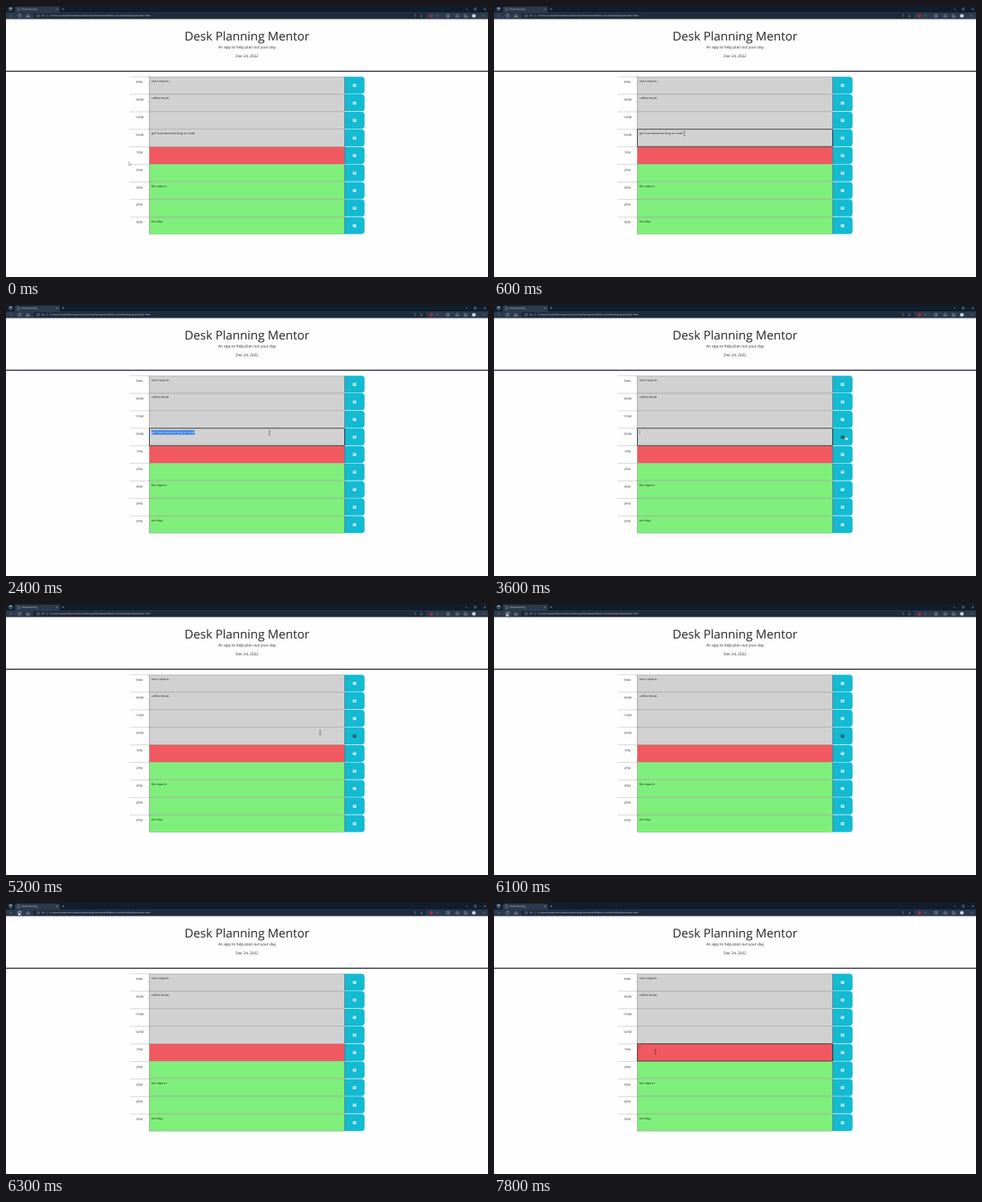
Write an HTML page that moves like this. It is 600x338 px and loops after 8 s.

```html
<!DOCTYPE html>
<html lang="en">
<head>
<meta charset="utf-8">
<title>Desk Planning</title>
<style>
  html, body { margin: 0; width: 100%; height: 100%; overflow: hidden; background: #fefefe; }
  svg { display: block; width: 100%; height: 100%; }
  text { text-rendering: geometricPrecision; white-space: pre; }
  .styled { font-family: "Open Sans", sans-serif; }
  .plain { font-family: "Liberation Sans", sans-serif; }
</style>
</head>
<body>
<svg id="stage" viewBox="0 0 600 338"></svg>
<script>
const LOOP = 8000;
const stage = document.getElementById('stage');

const LEFT = 154, TEXT = 178.4, SAVE = 421.7, RIGHT = 446.4;
const TOP = 88, PITCH = 21.875;
const HOURS = ['9AM', '10AM', '11AM', '12AM', '1PM', '2PM', '3PM', '4PM', '5PM'];
const NOTES = { 0: 'start reports', 1: 'coffee break', 6: 'file reports', 8: 'end day' };
const NOTE = 'get frustrated working on code';
const NOTE_ROW = 3, NOW_ROW = 4;
const COLORS = { past: '#d1d1d1', now: '#f0595f', next: '#7eef7a', save: '#13bad2', ink: '#222529' };

function add(parent, tag, attrs = {}, content) {
  const el = document.createElementNS('http://www.w3.org/2000/svg', tag);
  for (const key in attrs) el.setAttribute(key, attrs[key]);
  if (content !== undefined) el.textContent = content;
  parent.append(el);
  return el;
}
const group = (parent, attrs) => add(parent, 'g', attrs);
const rect = (parent, x, y, width, height, fill, more) =>
  add(parent, 'rect', { x, y, width, height, fill, ...more });
const path = (parent, d, stroke, width = 0.5, fill = 'none') =>
  add(parent, 'path', { d, stroke, 'stroke-width': width, fill });
const label = (parent, x, y, size, content, more) =>
  add(parent, 'text', { x, y, 'font-size': size, fill: COLORS.ink, ...more }, content);
const show = (el, on) => el.setAttribute('display', on ? 'inline' : 'none');
const rowY = i => TOP + i * PITCH;

function saveIcon(parent, y) {
  return add(parent, 'path', {
    d: `M432.2 ${y - 1.9}h2.8l.9.9v2.5q0 .4-.4.4h-3.3q-.4 0-.4-.4v-3q0-.4.4-.4z` +
       `M432.5 ${y - 1.4}v1h2.2v-1zM433.2 ${y + 0.7}a.65.65 0 1 0 1.3 0a.65.65 0 1 0-1.3 0z`,
    fill: '#fff', 'fill-rule': 'evenodd'
  });
}

function drawPage(styled) {
  const page = group(stage, { class: styled ? 'styled' : 'plain' });
  const shift = styled ? 0 : -11;
  const center = { 'text-anchor': 'middle' };
  rect(page, 0, 16, 600, 322, '#fefefe');
  label(page, 300, styled ? 43 : 42.3, 15.1, 'Desk Planning Mentor', center);
  label(page, 300, 53.1, styled ? 4.72 : 4.6, 'An app to help plan out your day', center);
  if (styled) label(page, 300, 63.9, 4.72, 'Dec 24, 2022', center);
  rect(page, 0, 80.7 + shift, 600, 1.4, '#2a2d38');

  const icons = HOURS.map((hour, i) => {
    const y = rowY(i) + shift;
    path(page, `M${LEFT} ${y + 0.2}H${TEXT}`, '#999', 0.4);
    path(page, `M${TEXT} ${y}v${PITCH}`, '#666', 0.4);
    label(page, 166, y + 8.3, 3.75, hour, center);
    if (styled) {
      const fill = i < NOW_ROW ? COLORS.past : i === NOW_ROW ? COLORS.now : COLORS.next;
      rect(page, TEXT + 0.2, y + 0.2, SAVE - TEXT - 0.3, PITCH - 0.5, fill,
        { stroke: '#777', 'stroke-width': 0.3 });
      if (NOTES[i]) label(page, 181, y + 6.5, 3.75, NOTES[i]);
    }
    const h = PITCH - 0.6, r = 4.2;
    path(page, `M${SAVE} ${y + 0.2}H${RIGHT - r}q${r} 0 ${r} ${r}v${h - 2 * r}` +
      `q0 ${r} ${-r} ${r}H${SAVE}z`, 'none', 0, COLORS.save);
    path(page, `M${SAVE} ${y + 0.2}v${h}`, '#234', 0.4);
    return saveIcon(page, y + 10.9);
  });
  return { page, icons };
}

function drawBrowser() {
  const g = group(stage, { class: 'styled' });
  const pale = '#c4ccd5';
  rect(g, 0, 0, 600, 8.5, '#0f1d2c');
  rect(g, 0, 8, 600, 8.4, '#2b3a4c');
  rect(g, 11, 0.8, 56, 9, '#2b3a4c', { rx: 1.5 });
  rect(g, 34, 9, 489, 6.5, '#1d2a3a', { rx: 1.2 });
  rect(g, 4, 2.2, 3.4, 3.4, 'none', { stroke: pale, 'stroke-width': 0.5, rx: 0.5 });
  rect(g, 4, 2.2, 3.4, 1.2, pale);
  path(g, 'M14.4 2.3h1.7l.8.8v2.9h-2.5z', pale, 0.35);
  label(g, 19.6, 5.1, 2.95, 'Desk Planning', { fill: '#dde3e9' });
  path(g, 'M62.7 3l1.8 1.8m0-1.8l-1.8 1.8M69.6 4h2.8m-1.4-1.4v2.8', pale, 0.4);
  path(g, 'M572 4h2.6M583 2.8h2.3v2.3H583zM594.8 2.8l2.4 2.4m0-2.4l-2.4 2.4', pale, 0.4);

  path(g, 'M8 12.2H4.7m1.5-1.5l-1.5 1.5l1.5 1.5', '#6d7986', 0.5);
  const reload = rect(g, 13.6, 9.2, 6.6, 6.3, '#435266', { rx: 1 });
  path(g, 'M18.3 11.2a1.8 1.8 0 1 0 .3 1.4m.1-2.3v1.2h-1.2', pale, 0.5);
  path(g, 'M25.6 14v-2l1.7-1.5l1.7 1.5v2h-1.2v-1.3h-1V14z', pale, 0.45);
  add(g, 'circle', { cx: 40, cy: 12.2, r: 1.6, fill: 'none', stroke: pale, 'stroke-width': 0.35 });
  path(g, 'M40 11.9v1.2m0-2v.3M51.2 10.5v3.4', pale, 0.35);
  label(g, 43.7, 13.3, 3.05, 'File', { fill: pale });
  label(g, 54, 13.3, 3.08,
    'C:/Users/rowan/Documents/bootcamp/Homework/Work-scheduler/Develop/index.html',
    { fill: '#e1e6eb' });

  path(g, 'M508 11h2.5m-1.2 0v2.8M516 11.2h2m-2 1.3h3m-3 1.3h2', '#a2adb8', 0.4);
  rect(g, 527.8, 10.4, 3.5, 3.5, '#b8283a', { rx: 0.5 });
  rect(g, 535.4, 10.8, 2.8, 2.8, '#435366', { rx: 0.4 });
  rect(g, 548.7, 10.7, 3, 3, 'none', { stroke: pale, 'stroke-width': 0.6, rx: 0.6 });
  path(g, 'M560 13.6v-2.2l1.5-.9l1.5.9l-1 1.1m-.5-.4h2v1.5h-3.5M570.3 10.7h2.7v2.3h-2.7zm1 2.3v1h2.7v-2', pale, 0.4);
  add(g, 'circle', { cx: 582.4, cy: 12.2, r: 2.3, fill: '#d0d4da' });
  path(g, 'M593 12.2h.6m.8 0h.6m.8 0h.6', pale, 0.6);
  return reload;
}

const outline = (parent, row) => rect(parent, TEXT + 0.1, rowY(row) + 0.1, SAVE - TEXT - 0.2,
  PITCH - 0.3, 'none', { stroke: '#15181c', 'stroke-width': 0.7, rx: 0.5 });

const bare = drawPage(false);
const planner = drawPage(true);
const reloadHover = drawBrowser();

// The note that gets selected and deleted
const noteY = rowY(NOTE_ROW);
const noteGroup = group(planner.page);
const note = label(noteGroup, 181, noteY + 6.5, 3.75, NOTE);
const highlight = rect(noteGroup, 181, noteY + 2.6, 0, 5.4, '#2f7fe4');
const clip = add(add(stage, 'clipPath', { id: 'picked' }), 'rect', { y: noteY, height: 12 });
label(noteGroup, 181, noteY + 6.5, 3.75, NOTE, { fill: '#fff', 'clip-path': 'url(#picked)' });

const noteFocus = outline(planner.page, NOTE_ROW);
const nowFocus = outline(planner.page, NOW_ROW);
const caret = rect(planner.page, 181, 0, 0.3, 5, '#222');

const pointers = {
  arrow: group(stage), beam: group(stage), hand: group(stage)
};
path(pointers.arrow, 'M0 0v4.6l1.1-1l.7 1.6l.7-.3l-.7-1.5h1.5z', '#333', 0.3, '#fff');
path(pointers.beam, 'M-1.1-2.7h.8l.3.3l.3-.3h.8M0-2.4v4.8M-1.1 2.7h.8l.3-.3l.3.3h.8', '#181818', 0.45);
path(pointers.hand, 'M-.4 0q.4-.5.8 0v1.8l1.7.4q.5.2.4.8l-.4 1.7h-2.6l-1.3-1.9q.2-.6.8-.2l.6.5z', '#333', 0.25, '#fff');

// time, x, y
const MOVES = [
  [0, 152.6, 194], [550, 237, 159], [640, 237, 159], [1000, 176.5, 160.5],
  [1340, 176.5, 160.5], [1400, 180, 160.5], [2000, 364, 160], [2200, 330, 160],
  [2400, 328, 159.5], [2820, 328, 159.5], [3500, 437, 163.5], [3700, 439.3, 163.8],
  [3900, 437, 164], [4100, 437, 164], [4200, 438.6, 163.8], [5110, 438.6, 163.8],
  [5200, 391, 160.5], [6000, 15.4, 11.6], [6520, 15.4, 11.6],
  [7300, 197, 184], [7420, 197, 184], [7700, 201, 185.5], [8000, 201, 185.5]
];

function pointerAt(t) {
  const i = Math.max(1, MOVES.findIndex(m => m[0] > t));
  const [t0, x0, y0] = MOVES[i - 1], [t1, x1, y1] = MOVES[i];
  const p = (t - t0) / (t1 - t0), k = p * p * (3 - 2 * p);
  return [x0 + (x1 - x0) * k, y0 + (y1 - y0) * k];
}

const noteEnd = 181 + note.getComputedTextLength();

function render(t) {
  const [x, y] = pointerAt(t);
  const loading = t >= 6200 && t < 6300;
  show(bare.page, loading);
  show(planner.page, !loading);

  show(noteGroup, t < 2600);
  const pickX = t < 600 ? noteEnd : t < 1000 ? Math.min(noteEnd, Math.max(181, x)) : 181;
  for (const el of [highlight, clip]) {
    el.setAttribute('x', pickX);
    el.setAttribute('width', noteEnd - pickX);
  }

  const editing = t >= 600 && t < 4400;
  const editingNow = t >= 7500;
  show(noteFocus, editing);
  show(nowFocus, editingNow);
  const blink = editingNow ? t - 7500 : t - 2600;
  show(caret, (editingNow || (editing && t >= 2600)) && blink % 1000 < 500);
  caret.setAttribute('y', rowY(editingNow ? NOW_ROW : NOTE_ROW) + 2.7);

  const onSave = x > SAVE && y > TOP;
  const saveActive = (onSave && t < 4400) || (t >= 4400 && t < 6200);
  planner.icons[NOTE_ROW].setAttribute('fill', saveActive ? '#20272b' : '#fff');
  show(reloadHover, y < 16 && x > 13 && x < 21);

  const inText = x > TEXT && x < SAVE && y > TOP;
  const dragging = t > 640 && t < 1400;
  const kind = onSave ? 'hand' : (inText || dragging) ? 'beam' : 'arrow';
  for (const name in pointers) show(pointers[name], name === kind);
  pointers[kind].setAttribute('transform', `translate(${x} ${y})`);
}

const start = performance.now();
function tick() {
  render((performance.now() - start) % LOOP);
  requestAnimationFrame(tick);
}
tick();
</script>
</body>
</html>
```
